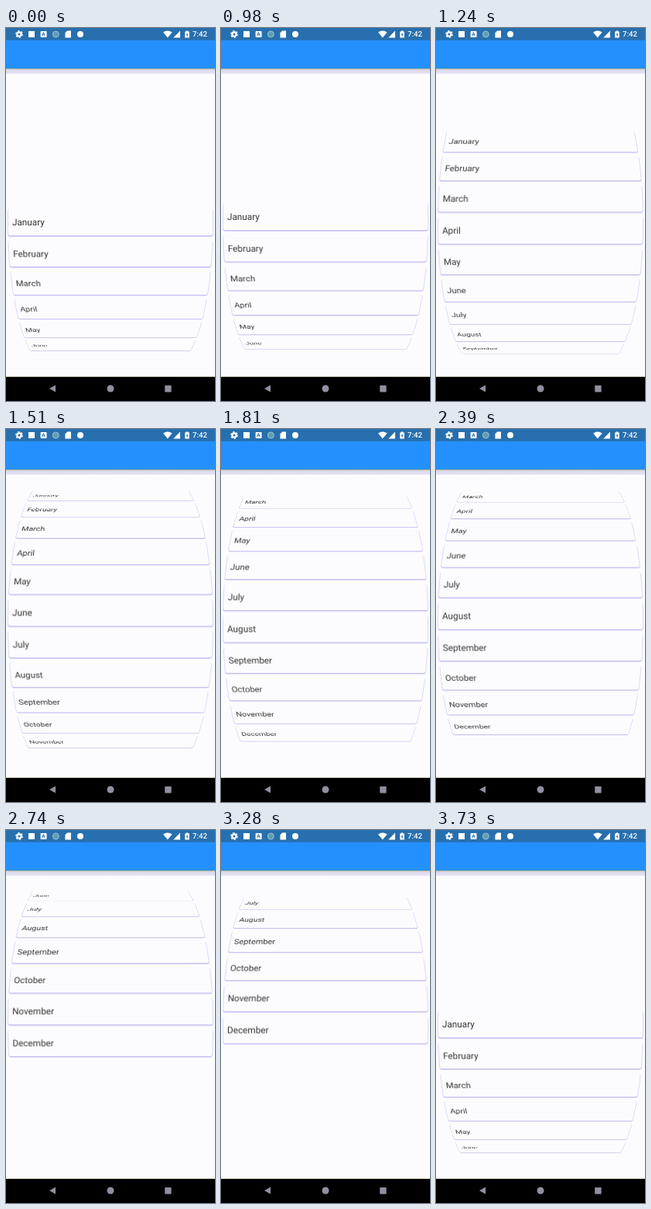
An HTML page for the animation above (4.12 s loop, 270x480 px).

```html
<!DOCTYPE html>
<html lang="en">
<head>
<meta charset="utf-8">
<title>Month wheel</title>
<style>
html, body { margin: 0; width: 100%; height: 100%; overflow: hidden; background: #fcfcfe; }
#stage { position: absolute; left: 0; top: 0; width: 270px; height: 480px; overflow: hidden; background: #fcfcfe; text-rendering: geometricPrecision; }
#wheel { position: absolute; left: 0; top: 52px; width: 270px; height: 396px; overflow: hidden; }
.item { position: absolute; left: 0; top: 178.3px; width: 270px; height: 39.4px; transform-origin: 50% 50%; }
.card {
  position: absolute; left: 2.6px; right: 2.6px; top: 2.6px; bottom: 2.6px;
  box-sizing: border-box; padding-left: 5.3px; border-radius: 2.6px; background: #fcfcfe;
  box-shadow: 0 1.2px .3px #c0bbee, 0 .8px .3px .8px #d2cdf8;
  font: 11.81px/34.2px Roboto, sans-serif; color: #363636; white-space: nowrap;
}
#bar { position: absolute; left: 0; top: 0; width: 270px; height: 52px; background: #2490fe; }
#shade { position: absolute; left: 0; top: 52px; width: 270px; height: 6.5px; background: linear-gradient(#a4ae90 1.3px, #d6d5e4 1.4px, #e8e5fa 6.5px); }
svg { position: absolute; left: 0; top: 0; }
</style>
</head>
<body>
<div id="stage">
  <div id="wheel"></div>
  <div id="bar"></div>
  <div id="shade"></div>
  <svg width="270" height="480" viewBox="0 0 270 480">
    <rect width="270" height="15.75" fill="#276fae"/>
    <g fill="#fff">
      <circle cx="17" cy="8" r="2.6" fill="none" stroke="#fff" stroke-width="2.2"/>
      <circle cx="17" cy="8" r="4.2" fill="none" stroke="#fff" stroke-width="1.4" stroke-dasharray="2.2 2.2"/>
      <rect x="29" y="4" width="8" height="8"/>
      <rect x="44.6" y="4" width="8" height="8" rx="1"/>
      <text x="48.6" y="10.4" font-family="Roboto, sans-serif" font-size="6.6" font-weight="700" text-anchor="middle" fill="#276fae">A</text>
      <circle cx="64.3" cy="8" r="4" fill="#5f9fb4" stroke="#a5c8d0" stroke-width=".9"/>
      <path d="M79.2 3.5H84V12.5H76.4V6.3Z"/>
      <circle cx="96" cy="8" r="4"/>
      <path d="M203 5.6Q208.8 1.4 214.6 5.6L208.8 12.6Z"/>
      <path d="M225 3.6V12.4H216.2Z"/>
      <path d="M231.2 4.6H232.8V3.5H235.2V4.6H236.8V12.6H231.2Z"/>
      <text x="241" y="11.4" font-family="Roboto, sans-serif" font-size="9.6" font-weight="500">7:42</text>
    </g>
    <path d="M234.4 5.8L232.6 9H233.8V11.4L235.5 8.2H234.4Z" fill="#276fae"/>
    <rect y="448" width="270" height="1" fill="#dcdcc4"/>
    <rect y="449" width="270" height="31"/>
    <g fill="#9090a0">
      <path d="M56 464L64 459.6V468.4Z"/>
      <circle cx="135" cy="464" r="4.5"/>
      <rect x="205.2" y="460" width="8.4" height="8.4" rx=".6"/>
    </g>
  </svg>
</div>
<script>
const LOOP = 4120, STEP = 43.33, START = 980;
const EXTENT = 39.375, HEIGHT = 396, RADIUS = 396, DEPTH = 0.003 / 0.6563;
const MAX_ANGLE = Math.asin(0.5);
const MONTHS = ['January', 'February', 'March', 'April', 'May', 'June', 'July',
  'August', 'September', 'October', 'November', 'December'];

// Scroll position in items: [ms, position]
const KEYS = [
  [0, 0], [937, 0], [980, 0.17], [1110, 1.2], [1280, 3.2], [1500, 5.33], [1803, 6.82], [2140, 7],
  [2300, 7], [2367, 7.23], [2500, 8.5], [2680, 10.2], [2860, 11], [3233, 11],
  [3276, 10.82], [3420, 8.2], [3580, 3.4], [3709, 0], [LOOP, 0]
];

const secant = i => (KEYS[i + 1][1] - KEYS[i][1]) / (KEYS[i + 1][0] - KEYS[i][0]);

// Harmonic mean of the neighbouring slopes keeps the curve free of overshoot
function slope(i) {
  if (i === 0 || i === KEYS.length - 1) return 0;
  const a = secant(i - 1), b = secant(i);
  return a * b > 0 ? 2 * a * b / (a + b) : 0;
}

function scrollAt(t) {
  let i = 0;
  while (i < KEYS.length - 2 && t >= KEYS[i + 1][0]) i++;
  const [t0, p0] = KEYS[i], [t1, p1] = KEYS[i + 1];
  const d = t1 - t0, u = (t - t0) / d, v = 1 - u;
  return v * v * (1 + 2 * u) * p0 + u * u * (3 - 2 * u) * p1
    + d * u * v * (v * slope(i) - u * slope(i + 1));
}

const wheel = document.getElementById('wheel');
const items = MONTHS.map(name => {
  const item = document.createElement('div');
  const card = document.createElement('div');
  item.className = 'item';
  card.className = 'card';
  card.textContent = name;
  item.append(card);
  wheel.append(item);
  return item;
});

function place(item, offset) {
  const shown = Math.abs(offset) < (HEIGHT + EXTENT) / 2;
  item.style.display = shown ? 'block' : 'none';
  if (!shown) return;
  const angle = offset / HEIGHT * 2 * MAX_ANGLE;
  const s = Math.sin(angle), c = Math.cos(angle);
  const m = [1, 0, 0, 0, 0, c, 0, DEPTH * s, 0, 0, 1, 0, 0, RADIUS * s, 0, 1 + DEPTH * RADIUS * (1 - c)];
  item.style.transform = `matrix3d(${m.map(n => n.toFixed(7))})`;
}

function draw(ms) {
  const t = ms % LOOP;
  const pos = t < START ? 0 : scrollAt(START + STEP * Math.floor((t - START) / STEP));
  items.forEach((item, i) => place(item, (i - pos) * EXTENT));
}

const origin = performance.now();
function tick() {
  draw(performance.now() - origin);
  requestAnimationFrame(tick);
}
tick();
</script>
</body>
</html>
```
